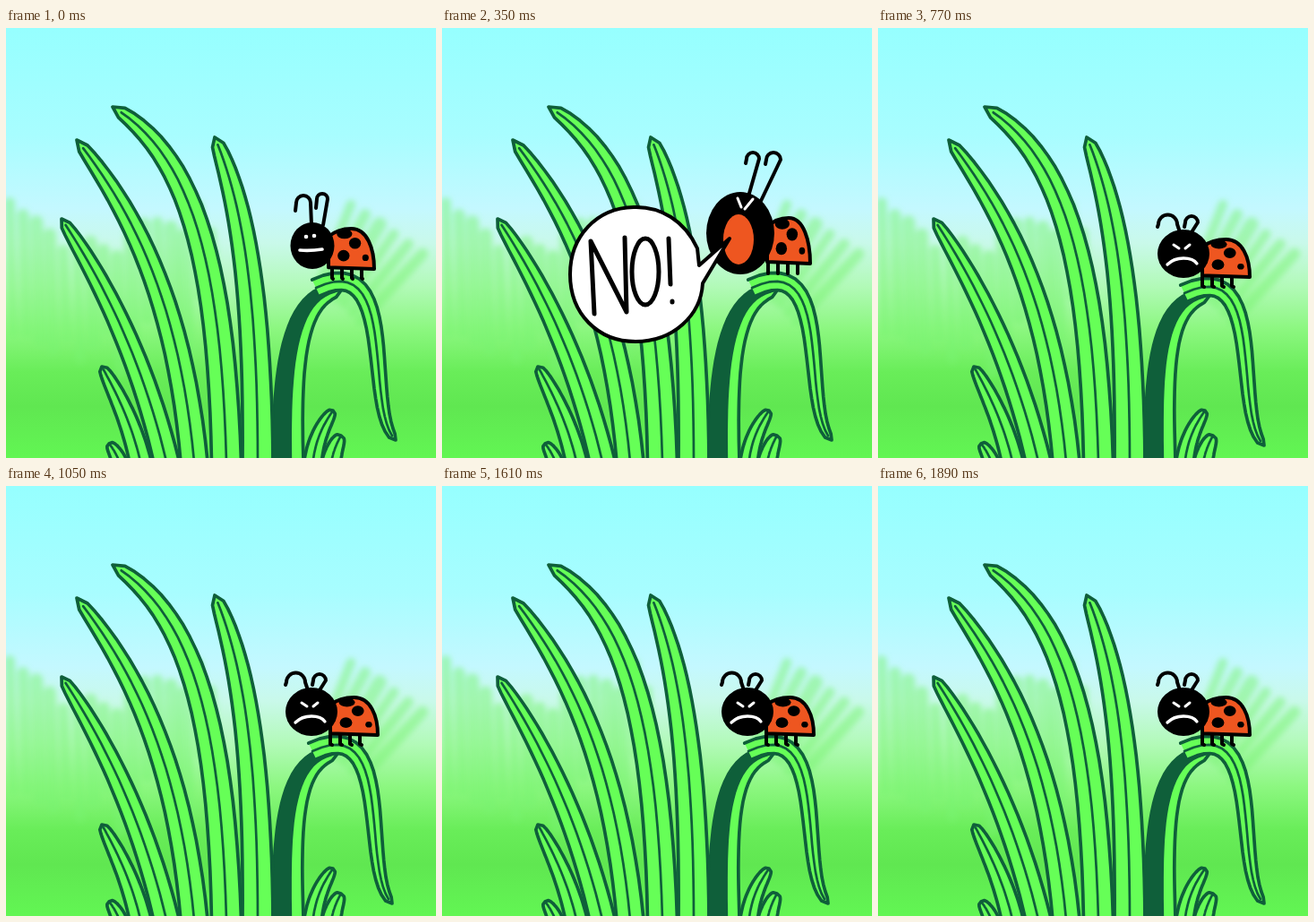
An HTML page that plays this animation: 480x480 px, repeating every 1960 ms.

```html
<!DOCTYPE html>
<html lang="en">
<head>
<meta charset="utf-8">
<title>Shouting ladybug</title>
<style>
  html, body { margin: 0; width: 100%; height: 100%; overflow: hidden; background: #96ffff; }
  svg { display: block; width: 100vw; height: 100vh; }
  path, ellipse { stroke-linecap: round; stroke-linejoin: round; vector-effect: non-scaling-stroke; }
</style>
</head>
<body>
<svg id="stage" viewBox="0 0 480 480">
  <defs>
    <linearGradient id="sky" x1="0" y1="0" x2="0" y2="1">
      <stop offset="0" stop-color="#96ffff"/>
      <stop offset=".25" stop-color="#a8fdff"/>
      <stop offset=".42" stop-color="#c4f8ff"/>
      <stop offset=".5" stop-color="#c9f9ea"/>
      <stop offset=".6" stop-color="#b2fab8"/>
      <stop offset=".7" stop-color="#8cf780"/>
      <stop offset=".8" stop-color="#69ed59"/>
      <stop offset=".88" stop-color="#60e751"/>
      <stop offset="1" stop-color="#62f653"/>
    </linearGradient>
    <filter id="soft" x="-20%" y="-20%" width="140%" height="140%">
      <feGaussianBlur stdDeviation="3"/>
    </filter>
  </defs>
  <rect width="480" height="480" fill="url(#sky)"/>
</svg>
<script>
const stage = document.getElementById('stage');
const GREEN = '#66ff57', DARK = '#0f5f3a', RED = '#ee5620', INK = '#000', WHITE = '#fff';
const STEP = 70, PHASES = 4;

function add(parent, tag, attrs = {}) {
  const el = document.createElementNS('http://www.w3.org/2000/svg', tag);
  for (const k in attrs) el.setAttribute(k, attrs[k]);
  parent.appendChild(el);
  return el;
}
const shape = (g, d, fill, stroke = 'none', width = 4) =>
  add(g, 'path', { d, fill, stroke, 'stroke-width': width });
const line = (g, d, color = INK, width = 4) => shape(g, d, 'none', color, width);
const oval = (g, cx, cy, rx, ry = rx, fill = INK, stroke = 'none') =>
  add(g, 'ellipse', { cx, cy, rx, ry, fill, stroke, 'stroke-width': 5 });

let seed = 7;
const random = () => (seed = seed * 16807 % 2147483647) / 2147483647;

// Points along a cubic spine, pushed sideways by k half-widths; the width grows from the tip
function edge([p, q, r, s], half, k, from = 0) {
  const out = [], n = 24;
  for (let i = 0; i <= n; i++) {
    const t = from + (1 - from) * i / n, u = 1 - t;
    const at = c => u * u * u * p[c] + 3 * u * u * t * q[c] + 3 * u * t * t * r[c] + t * t * t * s[c];
    const slope = c => u * u * (q[c] - p[c]) + 2 * u * t * (r[c] - q[c]) + t * t * (s[c] - r[c]);
    const dx = slope(0), dy = slope(1), w = k * half * t ** .3 / Math.hypot(dx, dy);
    out.push([(at(0) - dy * w).toFixed(1), (at(1) + dx * w).toFixed(1)]);
  }
  return out;
}
const trace = points => 'M' + points.join('L');
const strip = (spine, half, a, b) => trace([...edge(spine, half, a).reverse(), ...edge(spine, half, b)]);

function blade(g, spine, half, veinEnd = 0) {
  shape(g, strip(spine, half, 1, -1), GREEN, DARK, 3.7);
  line(g, trace(edge(spine, half, veinEnd, .04)), DARK, 2.7);
}

// Hazy grass: upright on the left, fanning out on the right
const haze = add(stage, 'g', { filter: 'url(#soft)', 'stroke-opacity': .5 });
const wisp = (x, y, dx, dy) => line(haze, `M${x} ${y}l${dx} ${dy}`, '#78f470', 10 + 6 * random());
for (let x = 4; x < 240; x += 15) wisp(x, 195 + 65 * random(), 4, 80 + 70 * random());
for (let i = 0; i < 6; i++) wisp(385 + 16 * i, 197 + 11 * i, -34 - 7 * i, 68 + 20 * random());

const lawn = add(stage, 'g');
blade(lawn, [[119, 88], [202, 138], [240, 250], [246, 484]], 16.5);
blade(lawn, [[79, 125], [138, 200], [193, 300], [210, 484]], 15);
blade(lawn, [[62, 213], [100, 270], [150, 360], [179, 484]], 14);
blade(lawn, [[233, 122], [262, 190], [281, 290], [281, 484]], 17);
blade(lawn, [[107, 378], [122, 405], [140, 440], [150, 484]], 12);
blade(lawn, [[115, 464], [120, 470], [126, 480], [129, 492]], 9);

// Bent blade: a dark folded stem and a drooping tip; sag lowers the bend
function arch(g, sag) {
  const low = ([x, y]) => [x - 4 * sag, y + 6 * sag];
  const stem = [low([374, 293]), low([318, 296]), [314, 390], [315, 484]];
  const droop = [[435, 460], [399, 425], [440, 245], [346, 290]].map(low);
  shape(g, strip(stem, 17, 1, -1), GREEN, DARK, 3.7);
  shape(g, strip(stem, 17, 1, -.25), DARK);
  blade(g, droop, 10);
}

// Wing case drawn in a unit box, with spots at fixed fractions of it
function body(g, x, y, w, h) {
  const box = add(g, 'g', { transform: `translate(${x} ${y}) scale(${w} ${h})` });
  shape(box, 'M0 .96V.2Q.2 0 .5 0C.85 0 1 .5 1 1Z', RED, INK);
  oval(box, .35, .13, .17, .12);
  oval(box, .58, .36, .13, .14);
  oval(box, .33, .67, .13, .14);
  oval(box, .81, .72, .07, .08);
}

function legs(g, x, y, foot) {
  for (let i = 0; i < 4; i++) line(g, `M${x + 11 * i} ${y}v11l${foot} 1`);
}

const antenna = (g, x, y, dx, dy, r, drop) =>
  line(g, `M${x} ${y}l${dx} ${dy}a${r} ${r} 0 0 0 ${-2 * r} 0l-1 ${drop}`);

function calm(g) {
  arch(g, 0);
  legs(g, 364, 268, 1);
  body(g, 360, 224, 51, 45);
  antenna(g, 341, 220, -1, -25, 8, 9);
  antenna(g, 354, 220, 5, -29, 6, 10);
  oval(g, 342, 243, 24.5, 26);
  oval(g, 335, 233, 2.3, 2.3, WHITE);
  oval(g, 344, 232, 2.3, 2.3, WHITE);
  line(g, 'M328 248q12 1 25 -1', WHITE, 3.6);
}

function bubble(g) {
  shape(g, 'M285 246C271 215 244 199 214 200C172 201 143 233 143 275C143 319 174 350 216 350' +
    'C258 350 289 321 291 285L321 235L287 265Z', WHITE, INK);
  const word = add(g, 'g', { role: 'img', 'aria-label': 'NO!' });
  line(word, 'M170 319L166 238L206 317L204 234', INK, 5);
  oval(word, 227, 272, 15, 37, 'none', INK);
  line(word, 'M253 235L255 286M257 305v1', INK, 5);
}

function shout(g, grow) {
  const scaled = (cx, cy, sx, sy) => add(g, 'g', {
    transform: `translate(${cx} ${cy}) scale(${1 + grow * sx} ${1 + grow * sy}) translate(${-cx} ${-cy})`
  });
  arch(g, 0);
  legs(g, 364, 262, 0);
  body(scaled(390, 264, 0, .08), 363, 212, 48, 51);
  const head = scaled(370, 262, .1, .24);
  antenna(head, 342, 188, 12, -42, 7, 5);
  antenna(head, 356, 193, 22, -46, 8, 5);
  oval(head, 333, 229, 38, 46);
  oval(head, 331, 236, 17, 28, RED);
  line(head, 'M330 190l4 10M347 191l-9 11', WHITE, 3);
  bubble(scaled(317, 237, .1, .1));
}

function squat(g) {
  arch(g, 1);
  legs(g, 362, 277, 2);
  body(g, 362, 236, 53, 42);
  antenna(g, 337, 228, -3, -9, 10.5, 3);
  antenna(g, 350, 228, 7, -11, 7, 5);
  oval(g, 341, 252, 29, 27);
  line(g, 'M330 242l6 4M348 242l-5 4', WHITE, 3);
  line(g, 'M323 264Q330 257 341 257T356 263', WHITE, 3.3);
}

const poses = [calm, g => shout(g, 0), g => shout(g, 1), squat];
poses.forEach((draw, i) => {
  const g = add(stage, 'g');
  draw(g);
  const frames = [];
  for (let k = 0; k <= PHASES; k++)
    frames.push({ offset: k / PHASES, opacity: k % PHASES === i ? 1 : 0, easing: 'step-end' });
  g.animate(frames, { duration: STEP * PHASES, iterations: Infinity });
});

const front = add(stage, 'g');
blade(front, [[365, 427], [358, 438], [345, 455], [342, 490]], 10);
blade(front, [[374, 455], [370, 462], [364, 474], [362, 492]], 11);
</script>
</body>
</html>
```
